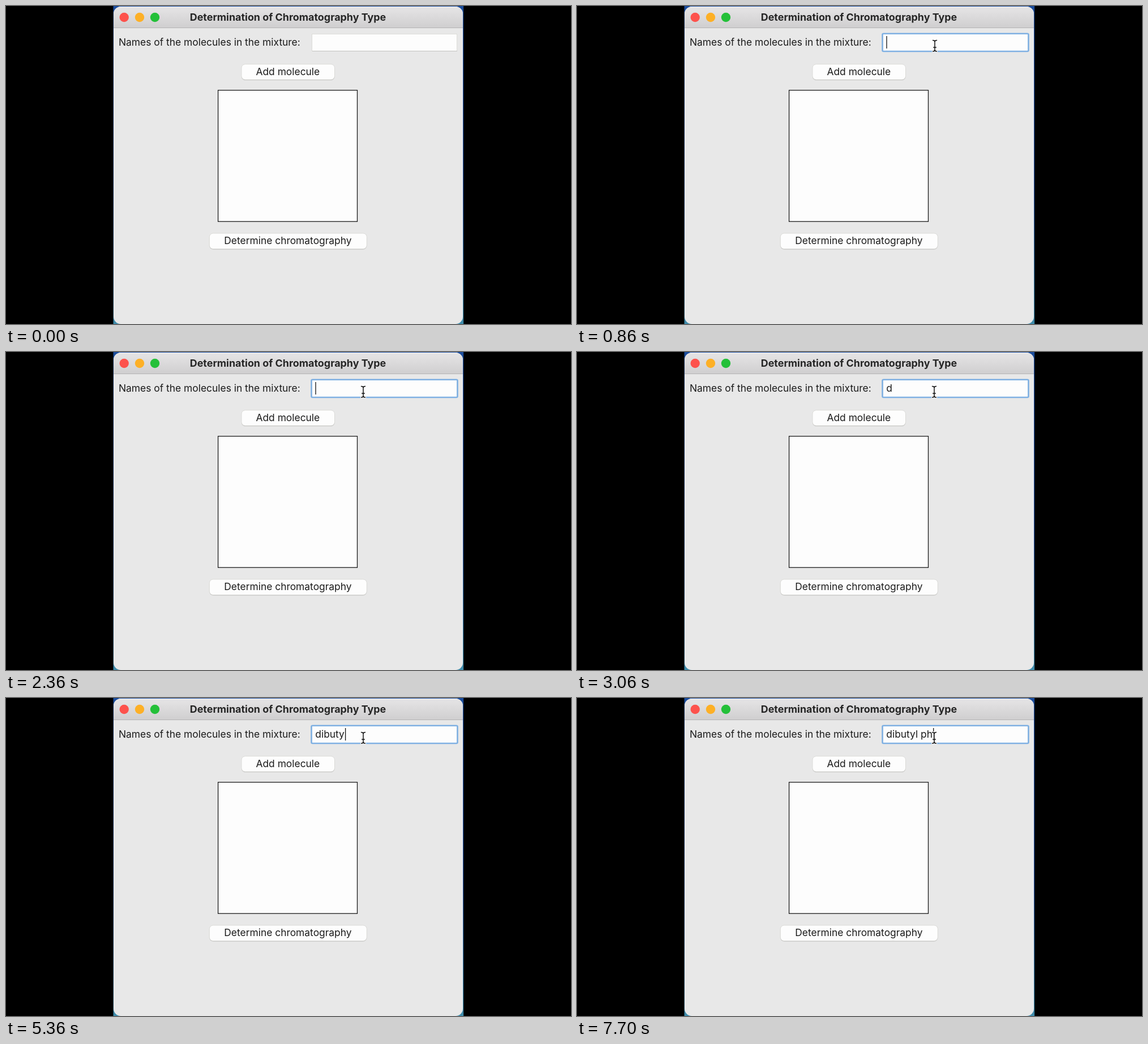
These frames come from a looping animation (998 by 561 pixels, 8 s). An HTML page:

```html
<!DOCTYPE html>
<html lang="en">
<head>
<meta charset="utf-8">
<title>Chromatography</title>
<style>
  html, body { margin: 0; width: 100%; height: 100%; overflow: hidden; background: #000; }
  svg { display: block; width: 100vw; height: 100vh; }
  text { font: 17.4px Inter, "Open Sans", sans-serif; fill: #1b1b1b; white-space: pre; }
  .title { font-weight: 700; font-size: 17.9px; fill: #262626; }
  .mid { text-anchor: middle; }
</style>
</head>
<body>
<svg viewBox="0 0 998 561">
  <defs>
    <linearGradient id="desk" x2="0" y2="1">
      <stop stop-color="#1c4d9c"/><stop offset=".6" stop-color="#244f9a"/><stop offset="1" stop-color="#3f8cab"/>
    </linearGradient>
    <linearGradient id="bar" x2="0" y2="1">
      <stop stop-color="#e6e5e6"/><stop offset="1" stop-color="#cfcecf"/>
    </linearGradient>
    <clipPath id="win"><rect x="190" y="1" width="617" height="560" rx="13"/></clipPath>
  </defs>

  <rect width="998" height="561"/>
  <rect x="189.5" width="618.7" height="561" fill="url(#desk)"/>
  <g clip-path="url(#win)">
    <rect x="190" width="618" height="561" fill="#e8e8e8"/>
    <rect x="190" y="1" width="618" height="38" fill="url(#bar)"/>
    <path d="M190 38.5H808" stroke="#b5b4b5"/>
    <path d="M200 1.5H797" stroke="#f3f3f3"/>
  </g>
  <circle cx="208.7" cy="20" r="8.2" fill="#fd524c"/>
  <circle cx="236" cy="20" r="8.2" fill="#fdb026"/>
  <circle cx="263" cy="20" r="8.2" fill="#24c039"/>
  <text class="title mid" x="498" y="26">Determination of Chromatography Type</text>

  <text x="199" y="70">Names of the molecules in the mixture:</text>
  <rect x="540.5" y="49.5" width="256" height="30" fill="#fdfdfd" stroke="#dcdcd8"/>
  <path d="M541 79.5H797" stroke="#c3c3bf"/>
  <rect id="ring" x="539.5" y="48.7" width="258" height="31.3" rx="2" fill="none" stroke="#80b1e3" stroke-width="2.6"/>
  <text id="entry" x="546.3" y="70"></text>
  <path id="caret" d="M.5 53V75" stroke="#111" stroke-width="1.3"/>

  <g id="buttons"></g>
  <rect x="374.6" y="148.6" width="245.9" height="231.6" fill="#fdfdfd" stroke="#1c1c1c" stroke-width="1.3"/>

  <path id="arrow" d="M0 0V18.5L4.2 14.6L7.5 22.2L10.5 21L7.4 13.4H13Z" fill="#000" stroke="#fff" stroke-width="1.3" stroke-linejoin="round"/>
  <g id="beam" fill="none" stroke-linecap="round">
    <path id="beamShape" d="M-3.5 -9.5Q0 -9.5 0 -7Q0 -9.5 3.5 -9.5M0 -7V7.5M-3.5 10Q0 10 0 7.5Q0 10 3.5 10M-2.3 3H2.3" stroke="#fff" stroke-width="3.4"/>
    <path id="beamCore" stroke="#111" stroke-width="1.5"/>
  </g>
</svg>
<script>
const LOOP = 8000, FOCUS = 800, ENTER = 60, ARRIVE = 640;
const WORD = 'dibutyl ph';
const KEY_TIMES = [2900, 3720, 4140, 4460, 4900, 5360, 5860, 6460, 6960, 7460];
const $ = id => document.getElementById(id);
const show = (id, on) => $(id).setAttribute('visibility', on ? 'visible' : 'hidden');
const move = (id, x, y) => $(id).setAttribute('transform', `translate(${x} ${y})`);

function button(x, y, w, h, label) {
  return `<rect x="${x}" y="${y + 1}" width="${w}" height="${h}" rx="6.5" fill="#bdbdbb"/>
    <rect x="${x}" y="${y}" width="${w}" height="${h}" rx="6.5" fill="#fdfdfd" stroke="#d6d6d2" stroke-width=".8"/>
    <text class="mid" x="${x + w / 2 - 0.4}" y="${y + 19.3}">${label}</text>`;
}
$('buttons').innerHTML = button(416, 102.7, 164.5, 27.3, 'Add molecule') +
  button(359.3, 401, 278, 27.5, 'Determine chromatography');
$('beamCore').setAttribute('d', $('beamShape').getAttribute('d'));

function caretOn(t) {
  if (t < FOCUS) return false;
  if (t < 2840) return t < 1720 || t >= 2180;
  return (t - 2840) % 900 >= 300;
}

function pointer(t) {
  if (t >= 1100) return [631, 70];
  if (t >= ARRIVE) return [632, 70];
  const [from, to, start, end] = t < 280
    ? [[800, 224], [720, 147.5], ENTER, 280]
    : [[720, 147.5], [632, 70], 280, ARRIVE];
  const k = (t - start) / (end - start);
  const ease = t < 280 ? k : 1 - (1 - k) ** 2;
  return from.map((a, i) => a + (to[i] - a) * ease);
}

function render(t) {
  const text = WORD.slice(0, KEY_TIMES.filter(k => k <= t).length);
  const entry = $('entry');
  if (entry.textContent !== text) entry.textContent = text;
  const width = text ? entry.getComputedTextLength() + 1 : 0;
  move('caret', 546.5 + width, 0);
  show('caret', caretOn(t));
  show('ring', t >= FOCUS);

  const [x, y] = pointer(t);
  const inField = x > 540 && x < 797 && y > 49 && y < 80;
  move('arrow', x, y);
  move('beam', x, y);
  show('arrow', t >= ENTER && !inField);
  show('beam', t >= ENTER && inField);
}

const begin = performance.now();
function tick() {
  render((performance.now() - begin) % LOOP);
  requestAnimationFrame(tick);
}
tick();
</script>
</body>
</html>
```
